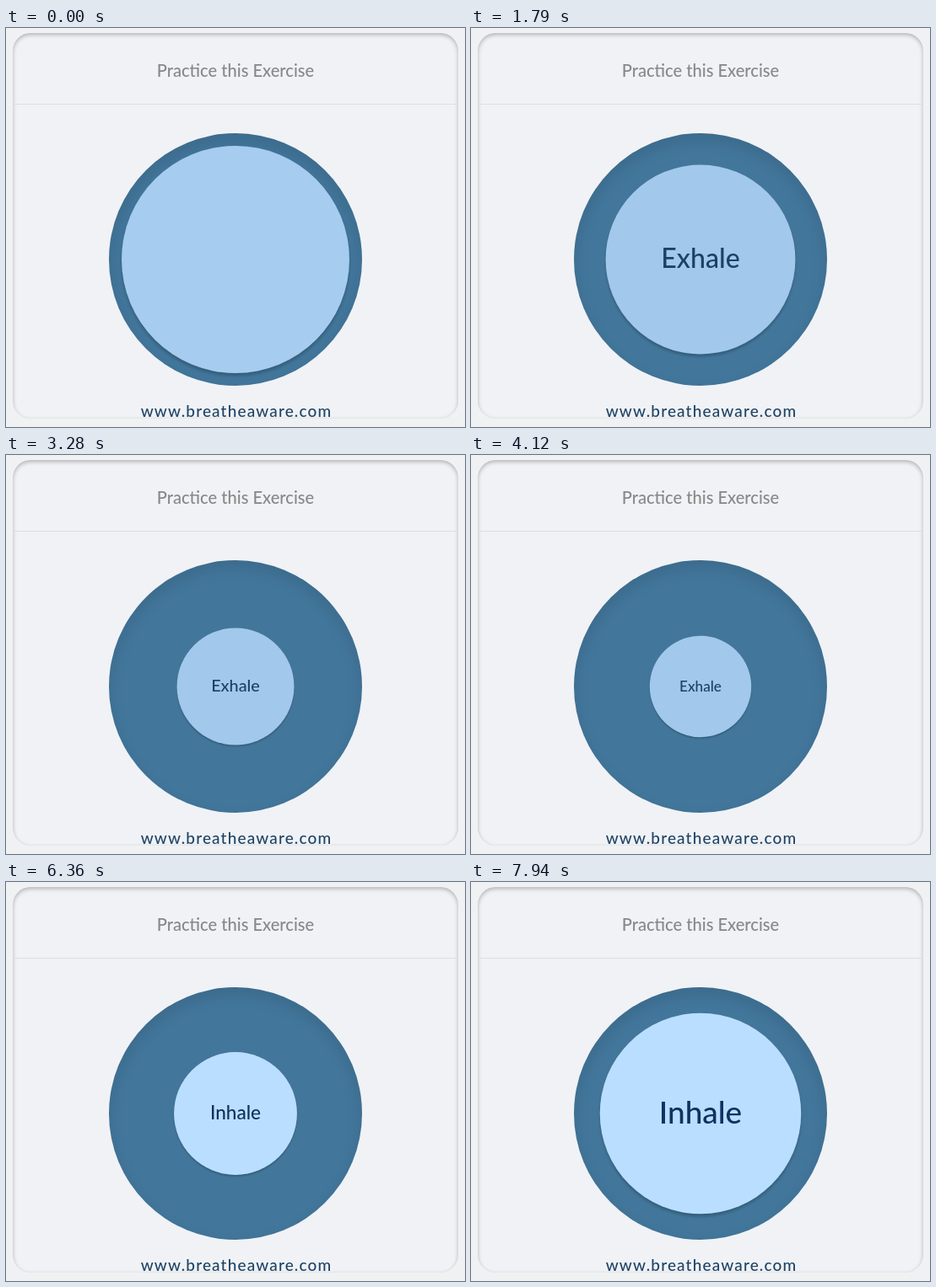
Recreate the animation shown at these times as an HTML page. Size 544x474 px, loop 8 s.

```html
<!DOCTYPE html>
<html lang="en">
<head>
<meta charset="utf-8">
<title>Breathing exercise</title>
<style>
  html, body { margin: 0; width: 100%; height: 100%; overflow: hidden; background: #f0f1f3; }
  body { font-family: Lato, sans-serif; font-weight: 500; }
  body * { position: absolute; box-sizing: border-box; }
  #stage { left: 0; top: 0; width: 544px; height: 474px; overflow: hidden; }
  #panel {
    left: 8px; top: 6px; width: 528px; height: 458px; border-radius: 21px;
    background: #f0f2f5;
    box-shadow: inset 0 2px 5px rgba(0, 0, 0, .27);
  }
  #rule { left: 9px; top: 90px; width: 526px; height: 1px; background: #dcdee1; }
  #ring {
    left: 122px; top: 125px; width: 300px; height: 300px; border-radius: 50%;
    background: #42769b;
    box-shadow: inset 0 8px 18px rgba(0, 0, 0, .1);
  }
  #disc {
    left: 0; top: 0; width: 300px; height: 300px; border-radius: 50%;
    box-shadow: 0 4px 4px rgba(0, 0, 0, .2);
  }
  svg { left: 0; top: 0; overflow: visible; }
  text { text-anchor: middle; }
</style>
</head>
<body>
<div id="stage">
  <div id="panel"></div>
  <div id="rule"></div>
  <div id="ring">
    <div id="disc">
      <svg width="300" height="300">
        <text id="exhale" x="150" y="164" font-size="42.8" fill="#1b4265">Exhale</text>
        <text id="inhale" x="150" y="165" font-size="46.5" fill="#0f3260">Inhale</text>
      </svg>
    </div>
  </div>
  <svg width="544" height="474">
    <text x="272" y="58" font-size="20.1" fill="#888">Practice this Exercise</text>
    <text x="273" y="462" font-size="19" letter-spacing="1.15" fill="#1f4466">www.breatheaware.com</text>
  </svg>
</div>
<script>
  const LOOP = 8000, MOVE = 4000, HOLD = 940, FADE = 200;
  const EXHALE = 270, INHALE = EXHALE + MOVE + HOLD;
  const WIDE = 135, NARROW = 60;
  const DARK = [162, 200, 236], LIGHT = [186, 222, 255];
  const [disc, exhale, inhale] = ["disc", "exhale", "inhale"].map(id => document.getElementById(id));

  const ramp = (t, start, length) => Math.min(1, Math.max(0, (t - start) / length));

  // cubic-bezier(.42, 0, .58, 1)
  function ease(x) {
    let low = 0, high = 1, s = .5;
    for (let i = 0; i < 20; i++) {
      s = (low + high) / 2;
      const at = 1.26 * s * (1 - s) ** 2 + 1.74 * s * s * (1 - s) + s ** 3;
      if (at < x) low = s; else high = s;
    }
    return s * s * (3 - 2 * s);
  }
  const glide = (t, start, length) => ease(ramp(t, start, length));

  function draw(t) {
    const size = 1 - glide(t, EXHALE, MOVE) + glide(t, INHALE, MOVE);
    const light = 1 - glide(t, EXHALE - HOLD, HOLD) + glide(t, INHALE - HOLD, HOLD);
    const color = DARK.map((c, i) => c + (LIGHT[i] - c) * light);
    disc.style.transform = `scale(${(NARROW + (WIDE - NARROW) * size) / 150})`;
    disc.style.backgroundColor = `rgb(${color})`;
    exhale.style.opacity = ramp(t, EXHALE - FADE, FADE) - ramp(t, EXHALE + MOVE, FADE);
    inhale.style.opacity = ramp(t, INHALE - FADE, FADE);
  }

  const begin = performance.now();
  function tick() {
    draw((performance.now() - begin) % LOOP);
    requestAnimationFrame(tick);
  }
  tick();
</script>
</body>
</html>
```
